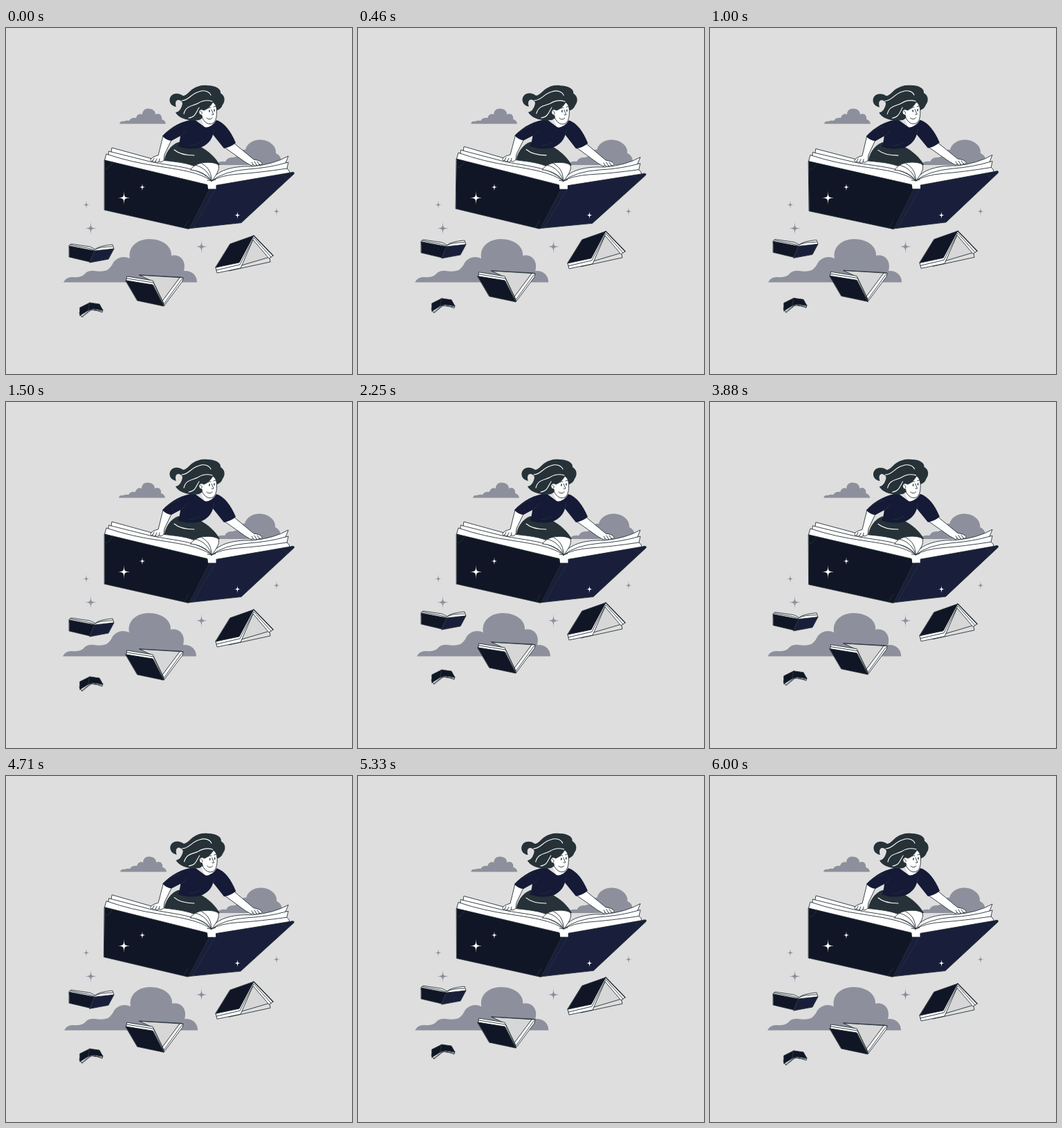
An HTML page that plays this animation: 500 px wide and 500 px high, repeating every 6.04 s.

```html
<!DOCTYPE html>
<html lang="en">
<head>
<meta charset="utf-8">
<title>Flying book</title>
<style>
  html, body { margin: 0; width: 100%; height: 100%; overflow: hidden; background: #dedede; }
  svg { display: block; width: 100vw; height: 100vh; }
  .cloud { fill: #8d909c; }
  .cover { fill: #101625; stroke: #263238; }
  .side { fill: #191f3a; stroke: #263238; }
  .paper { fill: #fff; stroke: #263238; }
  .inner { fill: #d7d7d7; stroke: #263238; }
  .hair { fill: #263238; }
  .shirt { fill: #151a36; }
  .ink { fill: none; stroke: #263238; }
  .shine { fill: none; stroke: #fff; stroke-width: 1.1; }
  path { stroke-width: .9; stroke-linejoin: round; stroke-linecap: round; }
</style>
</head>
<body>
<svg viewBox="0 0 500 500">
  <g id="clouds" class="cloud">
    <path d="M164 138.500Q165 134 170 135Q174 133 178 134Q181 129 188 130C189 125 194 123 197 125C197 119 201 116.500 206 116.500C212 116.500 216 120 216 125C221 122 226 126 225 132Q230 133 231 138.500Z"/>
    <path d="M83 367.500Q87 359 97 360Q110 361 114 355Q119 350 128 351Q138 353 146 350Q152 346 155 339Q161 331 170 331Q175 331 179 333C176 316 190 305 207 305C227 305 240 316 239 329C252 326 261 337 257 351C267 350 276 356 276 367.500Z"/>
    <path d="M303 198Q307 192 317 193Q320 186 329 187Q333 185 338 186C337 178 341 175 346 176C348 167 357 161.500 367 161.500C380 161.500 391 170 390 181C397 184 399 191 397 198Z"/>
  </g>

  <g id="ride">
    <!-- skirt -->
    <path class="hair" d="M249 165C238 169 229 181 228 196L268 207L309 198C303 187 292 177 280 171Z"/>
    <path class="shine" d="M243 176C250 182 260 184 272 184"/>

    <!-- pages -->
    <path class="paper" d="M142.500 191L145 182L148 183L148.500 178L152 179L153 173L211 189C245 195 280 191 297 221C303 207 325 199 356 200Q387 197 408 185L404 195L408 194L406 203L409 206L410 210L303 228H291Z"/>
    <path class="ink" d="M152 179L208 193C245 201 279 200 297 221M148 183Q180 194 222 200C253 205 281 209 297 221M404 195Q380 202 350 204Q314 207 297 221M406 203Q366 209 336 211Q310 213 297 221"/>
    <path class="paper" d="M267 205C272 193 297 192 306 197C310 201 306 211 297 221C291 212 279 206 267 205Z"/>
    <path class="ink" d="M273 198C287 201 294 211 297 221M283 196C294 202 297 211 297 221"/>

    <!-- cover -->
    <path class="side" d="M303 227.500L411 209Q418 207 416 211L340 281.500L262 290L291 232Z"/>
    <path class="cover" d="M142.500 191L291 226.500L294 233L265 290L262 290L142.500 263Z"/>
    <path class="ink" d="M142.500 204Q150 203 154 194M303 232L270 289M258 288L264 278M398 211.500L406 218"/>
    <path d="M291 222H303.500V232.500H292Z" fill="#fff"/>
    <path class="ink" d="M291 220L297 221L303 219"/>

    <!-- arms -->
    <path class="paper" d="M227 156L220 184Q211 186 209 190Q209 194 212 192Q213 195 216 193Q218 196 221 193Q225 195 228 191L229 183L239 162Z"/>
    <path class="ink" d="M212 192L214 188M216 193L218 189M221 193L222 189"/>
    <path class="paper" d="M315 172L346 194L353 198Q356 200 357 197Q360 201 362 198Q365 200 366 197Q370 199 370 195Q367 191 358 190L329 166Z"/>
    <path class="ink" d="M357 197L355 194M362 198L359 193M366 197L363 193"/>

    <!-- top -->
    <path class="shirt" d="M272 132C255 134 239 142 226 156Q231 162 239 163L252 156Q251 166 248 171Q263 177 281 173C291 169 297 162 299 154L315 174Q325 172 332 166C325 149 316 137 304 133Q298 144 287 143Z"/>
    <path class="ink" d="M252 156Q258 153 261 148M299 154L301 147M232 151Q240 144 251 142M265 170Q275 169 280 165"/>
    <path d="M281 130L287 143Q294 146 301 134L298 130Z" fill="#fff"/>

    <!-- head -->
    <path class="hair" d="M246 114C238 113 234 105 238 99C242 93 251 94 256 98C262 97 265 91 270 88C276 84 283 82 291 83C303 83 311 88 310 94C317 98 317 106 313 111Q311 117 305 119L290 119C286 125 285 131 279 133C264 135 250 131 245 122C250 121 252 118 254 113C256 108 255 106 250 104C245 103 244 109 246 114Z"/>
    <path class="paper" d="M299 107Q304 110 304.500 119Q305 131 301 136Q297 140 291 138Q287 136 284 131L283 126Q278 125 279 120Q281 116 286 119Q294 116 299 107Z"/>
    <path class="ink" d="M292 116Q294 114 296 115M300 114L303 113M297 118Q299 123 300 125Q298 126 297 125M290 130Q294 134 298 130M281 120Q284 121 283 124"/>
    <path d="M294 119V121M301 118V120" class="ink" style="stroke-width:1.500"/>
    <path class="shine" d="M257 124C260 112 269 113 277 109C285 104 292 104 298 106M254 105C264 105 267 95 279 92C287 89 294 92 296 97M264 130C274 129 275 121 279 115"/>
  </g>

  <g id="books">
    <path class="paper" d="M91.500 314L94 312L121 316Q126 318 129 320Q133 315 154 313L156 319L128 324L92 319Z"/>
    <path class="ink" d="M93 313.500L118 318L128 321M154 316Q136 316 129 320"/>
    <path class="cover" d="M91.500 315L128 322L121 338L91.500 331Z"/>
    <path class="side" d="M128 322L156 319L148 334L121 339Z"/>

    <path class="paper" d="M106 412L110 418L122 408L128 407L139 411L140 407L122 399Z"/>
    <path class="cover" d="M107 404L121 397L119 408L107 415.500Z"/>
    <path class="cover" d="M121 397L135 399L140 408L126 406L119 408Z"/>
    <path class="ink" d="M109 417L121 408M127 408L139 409"/>

    <path class="inner" d="M193 357L252 360L227 399L211 366Z"/>
    <path class="paper" d="M252 360L256 361L255 366L228 402L226 395ZM175 359L212 365L228 398V402L213 372L174 365Z"/>
    <path class="ink" d="M175 362L213 368L228 400M254 363L228 399M193 357L256 361"/>
    <path class="cover" d="M173 365L212 371L228 402L190 394Z"/>

    <path class="inner" d="M358 303L381 331L337 344Z"/>
    <path class="paper" d="M358 300L386 329L380 333L357 306L339 347L305 354L303 346L337 338Z"/>
    <path class="ink" d="M304 350L338 342L358 303L383 331M322 351L382 338L381 333"/>
    <path class="ink" d="M358 300L386 329" style="stroke-width:1.500"/>
    <path class="cover" d="M324 312L358 300L337 339L303 346Z"/>
  </g>
  <g id="stars"></g>
</svg>
<script>
  const $ = id => document.getElementById(id);
  const GREY = '#8d909c', WHITE = '#fff';

  // One concave arm edge, turned four times
  const star = (x, y, r, fill) => {
    const k = r * .05;
    return `<path transform="translate(${x} ${y})" fill="${fill}" d="M0 ${-r}
      C${k} ${-k} ${k} ${-k} ${r} 0C${k} ${k} ${k} ${k} 0 ${r}
      C${-k} ${k} ${-k} ${k} ${-r} 0C${-k} ${-k} ${-k} ${-k} 0 ${-r}Z"/>`;
  };
  $('stars').innerHTML = [
    [116, 255.5, 6.5, GREY], [122.5, 289.5, 10, GREY], [282.5, 316, 10, GREY], [391, 265, 6.5, GREY],
    [170.5, 245.5, 10, WHITE], [197, 230, 6, WHITE], [334.5, 270.5, 6, WHITE]
  ].map(s => star(...s)).join('');

  // Linear interpolation through evenly spaced keys, p in 0..1
  const along = (keys, p) => {
    const s = p * (keys.length - 1), i = Math.min(Math.floor(s), keys.length - 2);
    return keys[i] + (keys[i + 1] - keys[i]) * (s - i);
  };

  const LOOP = 6040, SHAKE = 6000, BOB = 1500;
  const drift = [0, -1, 2, -4, 4, -4, 4, -4, 2, -1, 0];
  const tilt = [0, 1, 0, -1, 0];
  const start = performance.now();

  function draw() {
    const t = (performance.now() - start) % LOOP, p = t % BOB / BOB;
    $('clouds').setAttribute('transform', `translate(${along(drift, t % SHAKE / SHAKE)} 0)`);
    $('books').setAttribute('transform', `translate(0 ${along([0, -10, 0], p)})`);
    $('ride').setAttribute('transform', `rotate(${along(tilt, p)} 279 186)`);
    requestAnimationFrame(draw);
  }
  draw();
</script>
</body>
</html>
```
